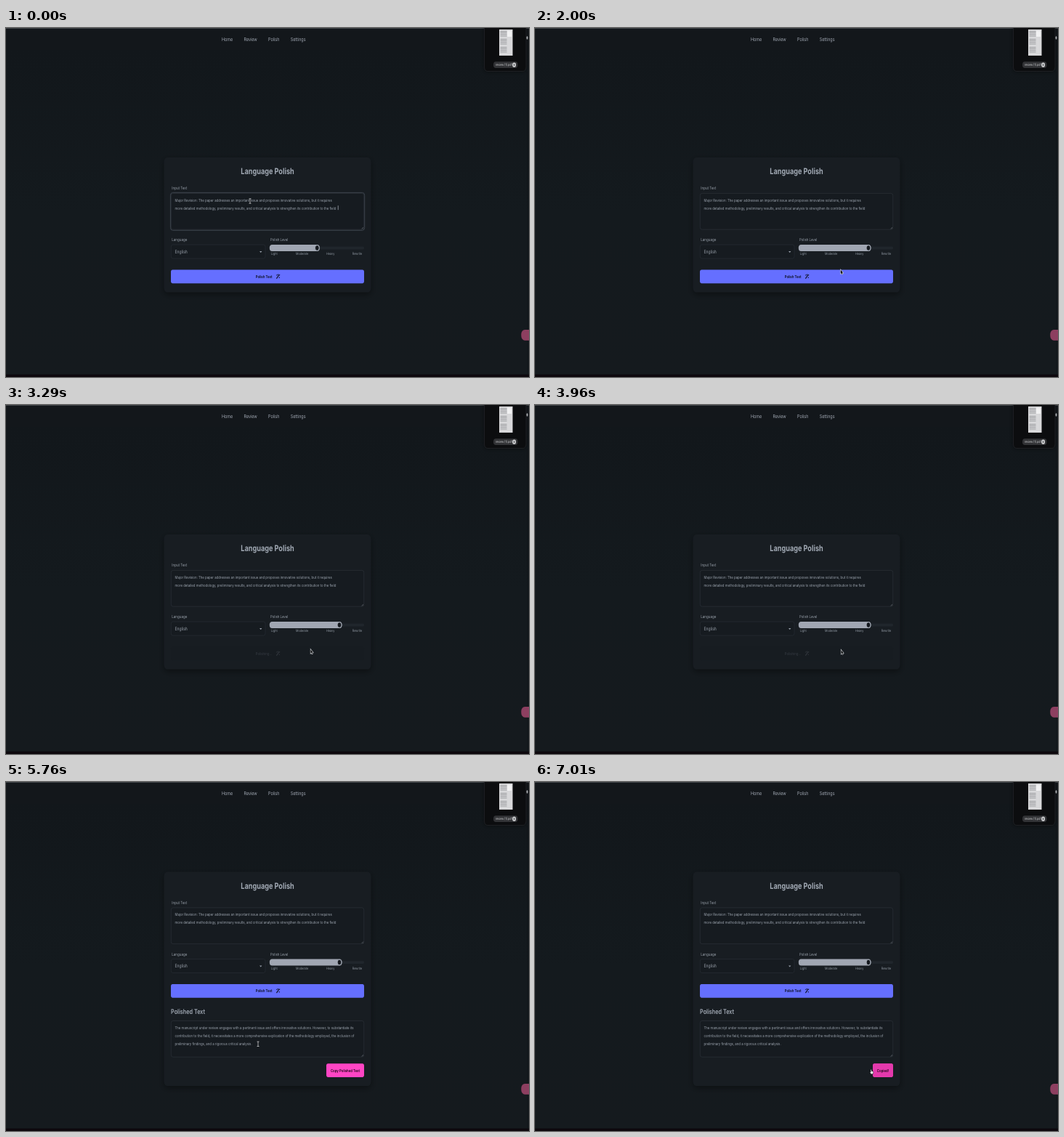
Recreate the animation shown at these times as an HTML page with a canvas. Size 720 px wide and 480 px high, loop 7050 ms.

```html
<!DOCTYPE html>
<html lang="en">
<head>
<meta charset="utf-8">
<title>Language Polish</title>
<style>
html, body { margin: 0; width: 100%; height: 100%; overflow: hidden; background: #14191d; }
canvas { display: block; }
</style>
</head>
<body>
<canvas id="stage" width="720" height="480"></canvas>
<script>
const ctx = document.getElementById('stage').getContext('2d');
const LOOP = 7050, SX = 0.309, SY = 0.393;   // the screen is squeezed sideways
const RESULT = 4700, SUBMIT = 3050, COPIED = 6840;

const ramp = (t, start, length) => Math.min(1, Math.max(0, (t - start) / length));
const smooth = p => p * p * (3 - 2 * p);
const easeOut = p => 1 - (1 - p) ** 1.8;

function box(x0, y0, x1, y1, fill, line, r = 8, width = 0.7) {
  ctx.beginPath();
  ctx.roundRect(x0, y0, x1 - x0, y1 - y0, { x: r * SX, y: r * SY });
  if (fill) { ctx.fillStyle = fill; ctx.fill(); }
  if (line) { ctx.strokeStyle = line; ctx.lineWidth = width; ctx.stroke(); }
}

// y is the middle of the capitals
function text(s, x, y, size, color, weight = 400, align = 'left') {
  ctx.save();
  ctx.translate(x, y + size * SY * 0.36);
  ctx.scale(SX, SY);
  ctx.font = `${weight} ${size}px Inter, "Open Sans", sans-serif`;
  ctx.textRendering = 'geometricPrecision';
  ctx.textAlign = align;
  ctx.fillStyle = color;
  ctx.fillText(s, 0, 0);
  ctx.restore();
}

function shape(points, fill, line, width = 0.7) {
  ctx.beginPath();
  points.forEach(([x, y]) => ctx.lineTo(x, y));
  ctx.closePath();
  if (line) { ctx.strokeStyle = line; ctx.lineWidth = width; ctx.stroke(); }
  ctx.fillStyle = fill;
  ctx.fill();
}

function oval(x, y, rx, ry, fill, line, width = 1) {
  ctx.beginPath();
  ctx.ellipse(x, y, rx, ry, 0, 0, 7);
  if (fill) { ctx.fillStyle = fill; ctx.fill(); }
  if (line) { ctx.strokeStyle = line; ctx.lineWidth = width; ctx.stroke(); }
}

function faded(alpha, draw) {
  ctx.save();
  ctx.globalAlpha *= alpha;
  draw();
  ctx.restore();
}

function page() {
  const g = ctx.createLinearGradient(0, 30, 0, 476);
  g.addColorStop(0, '#12171b');
  g.addColorStop(0.5, '#141a1e');
  g.addColorStop(1, '#151a1e');
  ctx.fillStyle = g;
  ctx.fillRect(0, 0, 720, 480);
  ctx.fillStyle = '#13171b';
  ctx.fillRect(0, 0, 720, 30);
  ctx.fillStyle = '#42464a';
  ctx.fillRect(0, 0, 720, 1);
  ctx.fillStyle = '#0d080d';
  ctx.fillRect(0, 476.5, 720, 4);
  ctx.fillStyle = '#101418';
  ctx.fillRect(717.5, 60, 1, 416);
  [['Home', 297], ['Review', 327.5], ['Polish', 361], ['Settings', 391.7]]
    .forEach(([s, x]) => text(s, x, 16, 17.5, '#a2a9b4'));
}

function thumbnail() {
  ctx.save();
  ctx.shadowColor = '#0008';
  ctx.shadowBlur = 6;
  box(658.5, -10, 716, 59.5, '#0c0d0f', null, 14);
  ctx.restore();
  box(658.5, -10, 716, 59.5, null, '#26282b', 14);
  ctx.fillStyle = '#d8d8da';
  ctx.fillRect(679, 2, 18.5, 36);
  ctx.fillStyle = '#8d8e92';
  for (let i = 0; i < 15; i++) {
    if (i % 5 !== 4) ctx.fillRect(680.5, 4 + i * 2.2, 9 + (i * 7) % 7, 0.8);
  }
  ctx.fillStyle = '#f1f1f2';
  ctx.fillRect(690, 4, 6, 8);
  box(671, 46.3, 704.5, 55, '#323336', null, 14);
  text('review (1).pdf', 674, 50.6, 11.5, '#d2d3d6');
  oval(699.6, 50.7, 2.5, 3.2, '#c9cacc');
  oval(699.6, 50.7, 0.8, 1.3, '#55565a');
  oval(717.5, 13.5, 0.9, 2.2, '#b9bbbe');
  box(709.3, 415, 728, 429.7, '#8d3f60', null, 16);
}

function area(y, lines, color) {
  box(227.3, y, 492.7, y + 49.7, '#161b20', '#2b3138');
  lines.forEach((s, i) => text(s, 232.5, y + 9.6 + i * 10.9, 14, color));
  ctx.strokeStyle = '#80868e';
  ctx.lineWidth = 0.5;
  ctx.beginPath();
  for (const d of [1, 2.5]) {
    ctx.moveTo(492 - d, y + 49);
    ctx.lineTo(492, y + 49 - d);
  }
  ctx.stroke();
}

function wand(color) {
  ctx.strokeStyle = color;
  ctx.lineWidth = 1.1;
  ctx.beginPath();
  ctx.moveTo(372.4, 344.6);
  ctx.lineTo(375.8, 339.8);
  ctx.stroke();
  ctx.fillStyle = color;
  [[372.3, 339.2], [374, 338.5], [375.7, 342.6], [376, 339]]
    .forEach(([x, y]) => ctx.fillRect(x, y, 1.1, 1.3));
}

function mainButton(t) {
  const on = t < RESULT ? 1 - ramp(t, SUBMIT, 200) : ramp(t, RESULT, 200);
  const hover = smooth(ramp(t, 2040, 200)) * (1 - smooth(ramp(t, SUBMIT, 200)));
  const busy = t >= SUBMIT && t < RESULT;
  const ink = busy ? '#32373e' : '#0a0d1c';
  const k = 1 + 0.05 * hover;
  ctx.save();
  ctx.translate(360, 341.8);
  ctx.scale(k, k);
  ctx.translate(-360, -341.8);
  const fill = color => box(227, 332.4, 493, 351.2, color);
  fill('#171c21');
  faded(on, () => {
    fill('#656fff');
    faded(hover, () => fill('#5560dc'));
  });
  text(busy ? 'Polishing...' : 'Polish Text', 343.7, 341.8, 14, ink, busy ? 500 : 600);
  wand(ink);
  ctx.restore();
}

function slider(x) {
  box(363, 300.7, 493, 304.4, '#20262c', null, 10);
  box(362.8, 298, x + 3.6, 307, '#a0a6b2', null, 14);
  oval(x, 302.5, 2.9, 3.8, '#15191f', '#a9afba', 0.9);
}

function form(t) {
  const light = '#a1a9b4', dim = '#979fa9';
  text('Language Polish', 360, 197.2, 29.5, light, 700, 'center');
  text('Input Text', 228.3, 220.4, 14.5, dim);
  area(227.4, [
    'Major Revision: The paper addresses an important issue and proposes innovative solutions, but it requires',
    'more detailed methodology, preliminary results, and critical analysis to strengthen its contribution to the field'
  ], dim);
  if (t < 1130) {
    box(226.4, 226.4, 493.7, 278.3, null, '#3c434c', 10, 1);
    if (t % 1000 < 500) {
      ctx.fillStyle = '#b4bac4';
      ctx.fillRect(456.8, 244.2, 0.7, 6);
    }
  }
  text('Language', 228.3, 291.2, 14.5, dim);
  text('Polish Level', 364, 291.2, 14, dim);
  box(227.3, 298, 357, 317, '#161b20', '#272d34');
  text('English', 232.5, 307.6, 16.5, dim);
  shape([[349, 307], [352.4, 307], [350.7, 309]], '#99a0ab');
  slider(t < 1300 ? 428.3 : 459);
  [['Light', 365], ['Moderate', 399], ['Heavy', 441], ['Rewrite', 476.8]]
    .forEach(([s, x]) => text(s, x, 310.6, 12.2, '#8f97a1'));
  mainButton(t);
}

function copyButton(t) {
  const done = t >= COPIED;
  const hover = ramp(t, 6330, 200) * (1 - 0.5 * ramp(t, COPIED, 300));
  const left = done ? 465 : 441;
  box(left, 387.2, 493, 406, '#ff45c4');
  faded(hover, () => box(left, 387.2, 493, 406, '#d935a2'));
  text(done ? 'Copied!' : 'Copy Polished Text', (left + 493) / 2, 396.6, 14, '#1b0716', 600, 'center');
}

function result(t) {
  text('Polished Text', 227, 316, 23.5, '#a1a9b4', 600);
  area(328.5, [
    'The manuscript under review engages with a pertinent issue and offers innovative solutions. However, to substantiate its',
    'contribution to the field, it necessitates a more comprehensive explication of the methodology employed, the inclusion of',
    'preliminary findings, and a rigorous critical analysis.'
  ], '#979fa9');
  copyButton(t);
}

function card(t) {
  const shown = t >= RESULT;
  ctx.save();
  ctx.shadowColor = '#0006';
  ctx.shadowBlur = 9;
  ctx.shadowOffsetY = 3;
  box(217.5, shown ? 123.5 : 178, 502.5, shown ? 418 : 363.5, '#181d22', null, 16);
  ctx.restore();
  ctx.save();
  if (shown) ctx.translate(0, -54.5);
  form(t);
  ctx.restore();
  if (shown) faded(easeOut(ramp(t, RESULT, 500)), () => result(t));
}

function ring(t, start, end, x, y) {
  if (t < start || t > end) return;
  const p = ramp(t, start, 90), k = 0.6 + 0.4 * p;
  faded(p * (1 - ramp(t, end - 120, 120)), () =>
    oval(x, y, 9.4 * k, 12 * k, '#ffffff0a', '#54585d', 1.4));
}

const path = [
  [0, 336, 238], [120, 336, 238], [1000, 443.7, 304.5], [1500, 443.7, 304.5],
  [2120, 419, 339], [3050, 419, 339], [3700, 422, 340], [4250, 422, 340],
  [4760, 369.2, 355.5], [5150, 369.2, 355.5], [5550, 347, 360.3],
  [5800, 347, 360.3], [6450, 463.5, 398.5], [LOOP, 463.5, 398.5]
];

const pointers = {
  beam() {
    for (const [color, width] of [['#0a0c0e', 1.6], ['#d5d8dc', 0.8]]) {
      ctx.strokeStyle = color;
      ctx.lineWidth = width;
      ctx.beginPath();
      ctx.moveTo(-1.5, -3.2); ctx.lineTo(1.5, -3.2);
      ctx.moveTo(0, -3.2); ctx.lineTo(0, 3.2);
      ctx.moveTo(-1.5, 3.2); ctx.lineTo(1.5, 3.2);
      ctx.stroke();
    }
  },
  arrow() {
    shape([[-0.5, -3], [-0.5, 2.2], [0.5, 1.2], [1.3, 3], [2, 2.6], [1.3, 0.9], [2.6, 0.9]],
      '#08090a', '#c9ccd0', 1.2);
  },
  hand() {
    shape([[-1.2, -3], [-0.4, -3], [-0.2, -0.8], [2, -0.3], [2.2, 1.2], [1.6, 3], [-0.9, 3], [-2.3, 0.4], [-1.2, 0.6]],
      '#e4e6ea', '#0b0d10', 1);
  }
};

const pointerTimes = [
  [0, 'beam'], [620, 'arrow'], [860, 'hand'], [1620, 'arrow'], [2040, 'hand'],
  [SUBMIT, 'arrow'], [RESULT, 'beam'], [6150, 'arrow'], [6330, 'hand']
];

function pointer(t) {
  const i = path.findIndex(k => k[0] > t);
  const [t0, x0, y0] = path[i - 1], [t1, x1, y1] = path[i];
  const p = smooth(ramp(t, t0, t1 - t0));
  ctx.save();
  ctx.translate(x0 + (x1 - x0) * p, y0 + (y1 - y0) * p);
  pointers[pointerTimes.findLast(k => k[0] <= t)[1]]();
  ctx.restore();
}

const begin = performance.now();

function frame() {
  const t = Math.max(0, performance.now() - begin) % LOOP;
  page();
  card(t);
  thumbnail();
  ring(t, 1110, 1500, 443.5, 302);
  ring(t, 2900, 3250, 419, 337.5);
  ring(t, 6680, 6980, 463.5, 396.5);
  pointer(t);
  requestAnimationFrame(frame);
}
frame();
</script>
</body>
</html>
```
